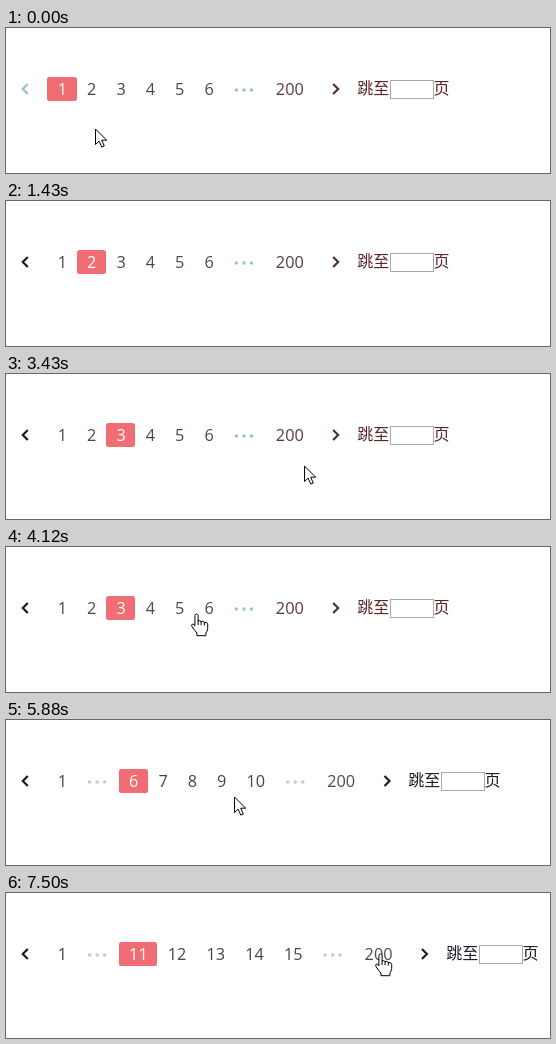
These frames come from a looping animation (544x145 px, 8 s). An HTML page:

```html
<!DOCTYPE html>
<html lang="zh-CN">
<head>
<meta charset="utf-8">
<title>Pagination</title>
<style>
  html, body { margin: 0; width: 100%; height: 100%; overflow: hidden; background: #fff; }
  svg { display: block; width: 544px; height: 145px; }
  .num { font: 16.3px "Open Sans", "Noto Sans", sans-serif; text-anchor: middle; }
  .cjk { font: 16px "Noto Sans CJK SC", "Noto Sans CJK", sans-serif; }
  #tip text { font-size: 12px; fill: #8a9fae; }
  .chevron { fill: none; stroke-width: 2.2; }
  .cursor { fill: #fff; stroke: #000; stroke-linejoin: round; }
</style>
</head>
<body>
<svg viewBox="0 0 544 145">
  <defs>
    <linearGradient id="shade" x2="0" y2="1">
      <stop offset="0" stop-color="#fff"/>
      <stop offset="1" stop-color="#e4e5f0"/>
    </linearGradient>
  </defs>
  <g id="pages"></g>
  <g id="tip">
    <rect x="331" y="90" width="49" height="21" rx="3" opacity=".2"/>
    <rect x="330" y="89" width="49" height="21" rx="3" opacity=".3"/>
    <rect x="328.5" y="86.5" width="48" height="21" rx="2.5" fill="url(#shade)" stroke="#85858f"/>
    <text class="cjk" x="334" y="101">下一页</text>
  </g>
  <g id="arrow" class="cursor">
    <path d="M0 .5V16L3.6 12.6L6.3 18.6L8.8 17.5L6.2 11.7H11.2Z"/>
  </g>
  <g id="hand" class="cursor">
    <path d="M-1.6 1.6Q-1.4 0 0 0T1.6 1.6V7Q3.4 6 4.6 7.6Q6.6 6.6 7.8 8.4Q10.6 7.6 11.2 10.2V14.5Q11 17 9.4 19V21.7H.4V19Q-2 16.4 -4.5 12.8Q-5.4 10.6 -4 10Q-2.6 9.8 -1.6 11.8Z"/>
    <path fill="none" d="M1.6 6.5V11M4.6 7.6V11.2M7.8 8.4V11.6"/>
  </g>
</svg>
<script>
const LOOP = 8000, LEFT = 41.3, DIGIT = 9.35, DOTS_W = 42, LAST = 200;
const $ = id => document.getElementById(id);

function add(parent, tag, attrs, text = "") {
  const node = document.createElementNS("http://www.w3.org/2000/svg", tag);
  for (const key in attrs) node.setAttribute(key, attrs[key]);
  node.textContent = text;
  return parent.appendChild(node);
}

const warm = { text: "#51444a", last: "#5a393e", next: "#523039", label: "#5a2428", dots: "#98c4d5" };
const cool = { text: "#48424e", last: "#54484f", next: "#17261f", label: "#1c1c26", dots: "#c5cbc8" };

// Each click selects a page; the visible run of pages begins at `start`
const states = [
  { at: 0, current: 1, start: 1 },
  { at: 1090, current: 2, start: 1 },
  { at: 2960, current: 3, start: 1 },
  { at: 4700, current: 6, start: 6 },
  { at: 6770, current: 11, start: 11 }
];

function itemsFrom(start) {
  const run = n => Array.from({ length: n }, (_, i) => start + i);
  return start === 1 ? [...run(6), "…", LAST] : [1, "…", ...run(5), "…", LAST];
}

function chevron(g, x, dir, stroke) {
  add(g, "path", { class: "chevron", stroke, d: `M${x - 2.5 * dir} 56l${5 * dir} 5l${-5 * dir} 5` });
}

function build({ current, start }) {
  const g = add($("pages"), "g", {});
  const tone = start === 1 ? warm : cool;
  let x = LEFT;
  chevron(g, 19.3, -1, current === 1 ? "#93bfd4" : "#1b1b1b");

  for (const item of itemsFrom(start)) {
    const isDots = item === "…";
    const w = isDots ? DOTS_W : 20 + DIGIT * String(item).length;
    const mid = x + w / 2;
    if (isDots) {
      for (const dx of [-7.5, 0, 7.5]) add(g, "circle", { cx: mid + dx - .5, cy: 62, r: 1.8, fill: tone.dots });
    } else {
      const active = item === current;
      if (active) {
        const l = Math.round(x), r = Math.round(x + w);
        add(g, "rect", { x: l, y: 49, width: r - l, height: 24, rx: 2.5, fill: "#ef6d73" });
      }
      const fill = active ? "#fff" : item === LAST ? tone.last : tone.text;
      add(g, "text", { class: "num", x: mid + .4, y: 67, fill }, item);
    }
    x += w;
  }

  chevron(g, x + 22.2, 1, tone.next);
  const label = Math.round(x + 44.4);
  add(g, "text", { class: "cjk", x: label - .7, y: 66.4, fill: tone.label }, "跳至");
  add(g, "rect", { x: label + 32.5, y: 52.5, width: 43, height: 18, fill: "#fff", stroke: "#a9a9a9" });
  add(g, "text", { class: "cjk", x: label + 75.6, y: 66.4, fill: tone.label }, "页");
  return g;
}
const groups = states.map(build);

// Pointer moves: `sag` bows the path downwards, `ease` is the ease-out power
const moves = [
  { from: 370, until: 690, to: [82, 61] },
  { from: 1090, until: 1430, to: [127, 150] },
  { from: 1430, until: 1630, to: [254, 146] },
  { from: 1630, until: 2070, to: [331, 65] },
  { from: 3260, until: 4050, to: [179, 67], sag: 75 },
  { from: 4080, until: 4370, to: [204, 67], ease: 4 },
  { from: 4890, until: 5230, to: [222, 88] },
  { from: 5400, until: 5550, to: [220, 73] },
  { from: 5850, until: 6390, to: [296, 65], sag: 22, ease: 2 },
  { from: 7000, until: 7500, to: [374, 61], sag: 36 }
];
const HOME = [89, 100];

const clamp = v => Math.max(0, Math.min(1, v));

function pointer(t) {
  let [x, y] = HOME;
  for (const { from, until, to, sag = 0, ease = 1 } of moves) {
    if (t < from) break;
    const k = 1 - (1 - clamp((t - from) / (until - from))) ** ease;
    x += (to[0] - x) * k;
    y += (to[1] - y) * k + 2 * k * (1 - k) * sag;
  }
  return [x, y];
}

const show = (node, on) => node.setAttribute("visibility", on ? "visible" : "hidden");

function draw(t) {
  const now = states.filter(s => s.at <= t).length - 1;
  groups.forEach((g, i) => show(g, i === now));
  $("tip").setAttribute("opacity", Math.min(clamp((t - 2580) / 140), clamp((3090 - t) / 130)));

  const [x, y] = pointer(t).map(Math.round);
  const over = y < 75;
  $("arrow").setAttribute("transform", `translate(${x + .5} ${y + .5})`);
  $("hand").setAttribute("transform", `translate(${x + .5} ${y})`);
  show($("arrow"), !over);
  show($("hand"), over);
}

const begin = performance.now();
function frame() {
  draw((performance.now() - begin) % LOOP);
  requestAnimationFrame(frame);
}
frame();
</script>
</body>
</html>
```
